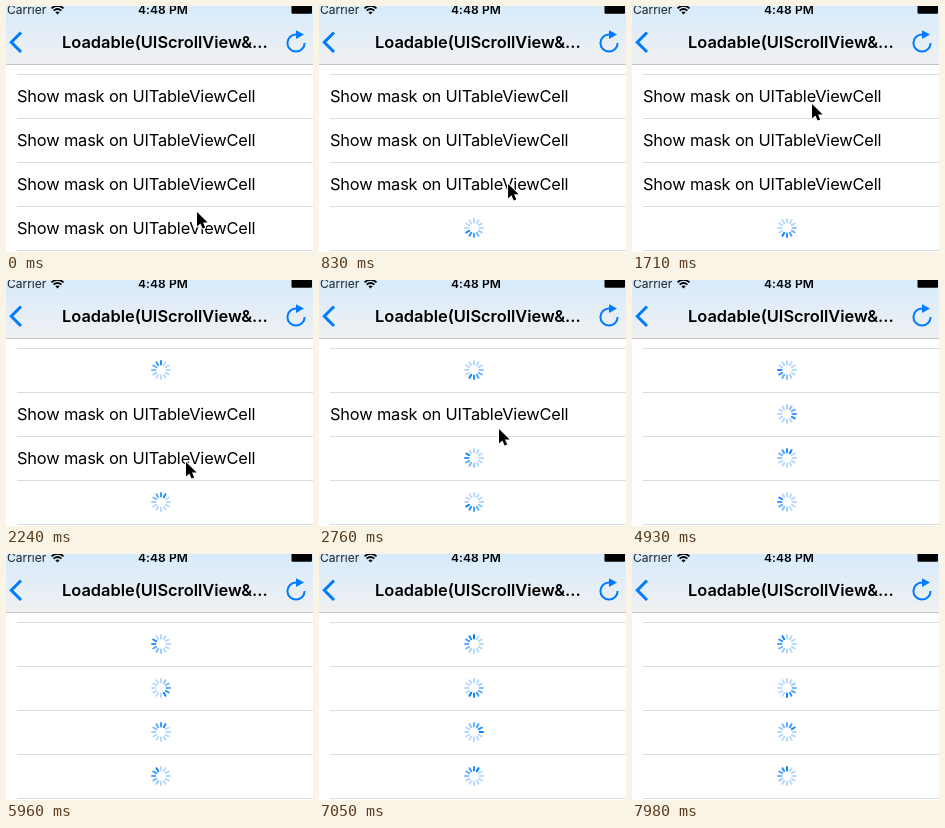
Recreate the animation shown at these times as an HTML page. Size 307 by 246 pixels, loop 8 s.

```html
<!DOCTYPE html>
<html lang="en">
<head>
<meta charset="utf-8">
<title>Loadable cells</title>
<style>
  html, body { margin: 0; width: 100%; height: 100%; overflow: hidden; background: #fff; }
  svg { display: block; width: 307px; height: 246px; font-family: Inter, Roboto, sans-serif; }
  .label { font-size: 16.4px; letter-spacing: -.17px; }
  .title { font-size: 16.4px; font-weight: 600; }
  .status { font-size: 12px; }
</style>
</head>
<body>
<svg id="stage" viewBox="0 0 307 246">
  <defs>
    <linearGradient id="bar" x1="0" y1="0" x2="0" y2="1">
      <stop offset="0" stop-color="#d7ebfc"/>
      <stop offset="1" stop-color="#f0f0f1"/>
    </linearGradient>
  </defs>
  <rect width="307" height="246" fill="#fff"/>
  <g id="rows"></g>
  <rect width="307" height="58" fill="url(#bar)"/>
  <rect y="58" width="307" height="1" fill="#c4c4c6"/>
  <text class="status" x="1" y="8.4" fill="#222">Carrier</text>
  <g fill="none" stroke="#000" stroke-width="1.8" transform="translate(0 -.8)">
    <path d="M45.5 3.2Q51.5 -2 57.5 3.2M47.6 5.4Q51.5 2.1 55.4 5.4"/>
    <path d="M51.5 9.2L49.4 7Q51.5 5.4 53.6 7Z" fill="#000" stroke="none"/>
  </g>
  <text class="status" x="132" y="8.4" font-weight="600" letter-spacing=".1">4:48 PM</text>
  <rect x="285.5" y="-1" width="20.5" height="8.7" rx="1"/>
  <text class="title" x="56" y="42">Loadable(UIScrollView&amp;...</text>
  <g fill="none" stroke="#007aff">
    <path d="M15 26.5L5.3 36.3L15 46" stroke-width="3"/>
    <path d="M298.6 37A8.6 8.6 0 1 1 290 28.4" stroke-width="2"/>
    <path d="M290 24.2L298 28.6L290 33Z" fill="#007aff" stroke="none"/>
  </g>
  <path id="cursor" d="M0 0V14.6L3.4 11.4L5.6 16.6L8.2 15.5L6 10.4H10.6Z"
        stroke="#fff" stroke-width="2" stroke-linejoin="round" paint-order="stroke"/>
</svg>
<script>
const LOOP = 8000, TURN = 977, SPOKES = 12, TEXT = "Show mask on UITableViewCell";
const LINE = "#dcdcdf";
// press time, and spinner head (in clock hours) at PHASE_AT
const PHASE_AT = 3550;
const cells = [
  { press: 1760, hour: 5 },
  { press: 2860, hour: 0 },
  { press: 2300, hour: 8.3 },
  { press: 380, hour: 6 }
];
// cursor stops: time, x, y
const path = [
  [0, 191, 206], [620, 191, 206], [1120, 186, 133], [1480, 180, 98], [1900, 180, 98],
  [2220, 180, 182], [2460, 180, 182], [2720, 180, 149], [3060, 180, 149], [3420, 310, 149]
];

const make = (parent, tag, attrs) => {
  const el = document.createElementNS("http://www.w3.org/2000/svg", tag);
  for (const k in attrs) el.setAttribute(k, attrs[k]);
  return parent.appendChild(el);
};
const clamp = v => Math.max(0, Math.min(1, v));
const mod = (a, n) => ((a % n) + n) % n;
const ease = v => v * v * (3 - 2 * v);

const rows = document.getElementById("rows");
const cursor = document.getElementById("cursor");
const rule = y => make(rows, "rect", { x: 11, y, width: 296, height: 1, fill: LINE });
rule(68);

cells.forEach((c, i) => {
  const top = 68 + 44 * i;
  c.shade = make(rows, "rect", { x: 0, y: top, width: 307, height: 45, fill: "#d9d9d9" });
  make(rows, "text", { class: "label", x: 11, y: top + 28.4 }).textContent = TEXT;
  c.mask = make(rows, "g", {});
  make(c.mask, "rect", { x: 0, y: top + 1, width: 307, height: 43, fill: "#fff" });
  c.spokes = Array.from({ length: SPOKES }, (_, k) => make(c.mask, "rect", {
    x: -1, y: -10, width: 2, height: 5.4, rx: 1, fill: "#007aff",
    transform: `translate(155 ${top + 22}) rotate(${k * 30})`
  }));
  rule(top + 44);
});

function place(t) {
  let k = 0;
  while (k < path.length - 2 && t >= path[k + 1][0]) k++;
  const [t0, x0, y0] = path[k], [t1, x1, y1] = path[k + 1];
  const p = ease(clamp((t - t0) / (t1 - t0)));
  cursor.setAttribute("transform", `translate(${x0 + (x1 - x0) * p} ${y0 + (y1 - y0) * p})`);
}

function draw(t) {
  for (const c of cells) {
    const since = t - c.press;
    c.shade.setAttribute("opacity", since < 0 ? 0 : 1 - clamp((since - 120) / 240));
    c.mask.setAttribute("opacity", clamp((since - 100) / 220));
    const head = c.hour + (t - PHASE_AT) / TURN * SPOKES;
    c.spokes.forEach((s, k) =>
      s.setAttribute("opacity", Math.max(.28, 1 - .13 * mod(head - k, SPOKES))));
  }
  place(t);
}

const start = performance.now();
function tick() {
  draw((performance.now() - start) % LOOP);
  requestAnimationFrame(tick);
}
tick();
</script>
</body>
</html>
```
